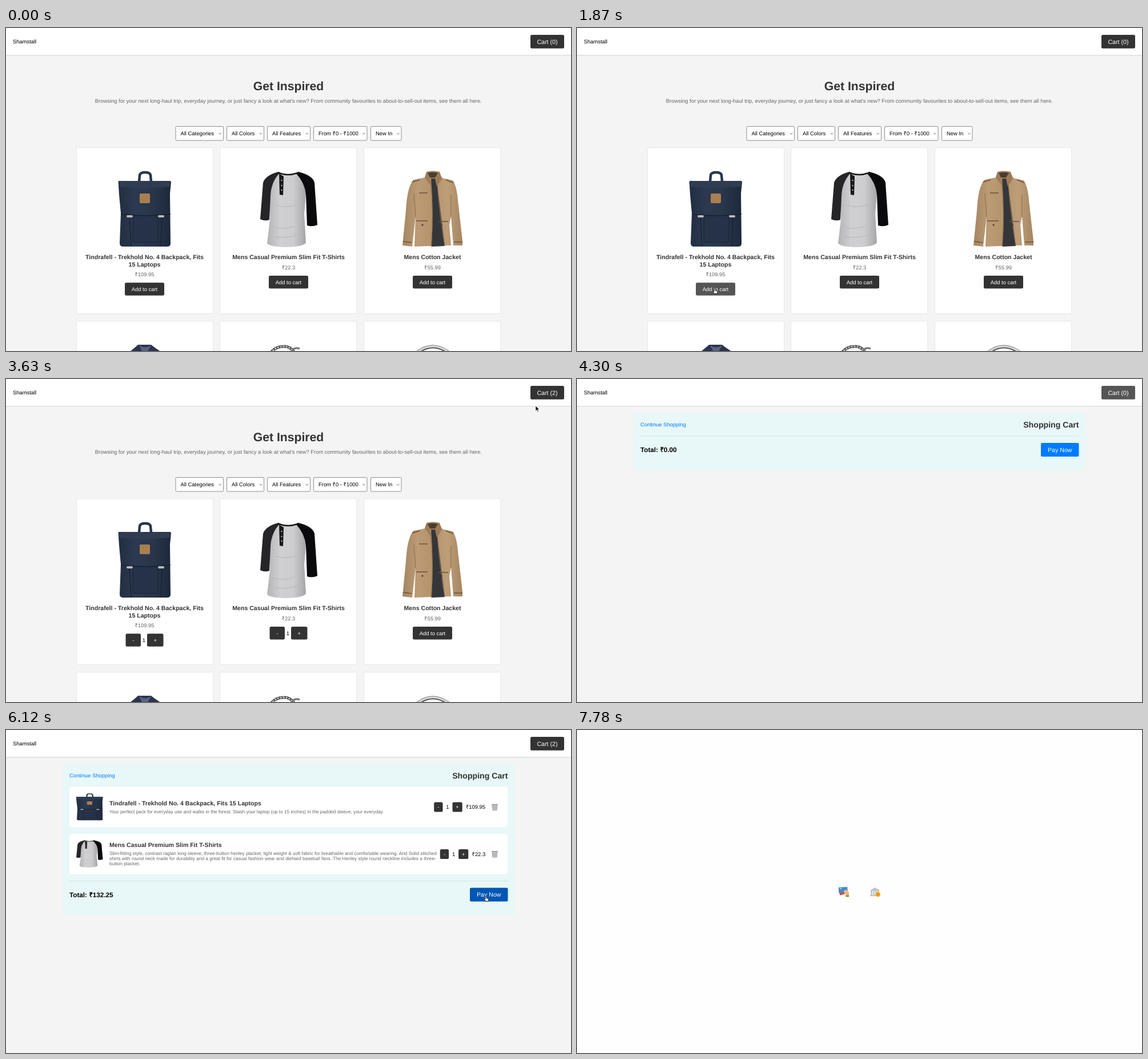
An HTML page for the animation above (8 s loop, 989 px wide and 566 px high).

```html
<!DOCTYPE html>
<html lang="en">
<head>
<meta charset="utf-8">
<title>Shop checkout</title>
<style>
html, body { margin: 0; width: 100%; height: 100%; overflow: hidden; background: #f4f4f4; }
svg { display: block; width: 989px; height: 566px; }
text { font-family: "Liberation Sans", Arial, sans-serif; text-rendering: geometricPrecision; white-space: pre; }
</style>
</head>
<body>
<svg id="stage" viewBox="0 0 989 566"></svg>
<script>
const LOOP = 8000;
const REM = 9.42, MID = 10.6;
const PACK = ['Tindrafell - Trekhold No. 4 Backpack, Fits', '15 Laptops'];
const SHIRT = 'Mens Casual Premium Slim Fit T-Shirts';

// Drawing helpers
const rect = (x, y, w, h, fill, r = 0, more = '') =>
  `<rect x="${x}" y="${y}" width="${w}" height="${h}" rx="${r}" fill="${fill}" ${more}/>`;
const text = (x, y, s, size = REM, fill = '#000', anchor = 'start', bold = false) =>
  `<text x="${x}" y="${y}" font-size="${size}" fill="${fill}" text-anchor="${anchor}" font-weight="${bold ? 700 : 400}">${s}</text>`;
const centered = (x, y, s, size, fill, bold) => text(x, y, s, size, fill, 'middle', bold);
const path = (d, fill, more = '') => `<path d="${d}" fill="${fill}" ${more}/>`;
const line = (d, color, width = 1, more = '') => path(d, 'none', `stroke="${color}" stroke-width="${width}" ${more}`);
const dot = (x, y, r, fill) => `<circle cx="${x}" cy="${y}" r="${r}" fill="${fill}"/>`;
const group = (id, body) => `<g id="${id}">${body}</g>`;
const shade = (id, ...colors) => `<linearGradient id="${id}">` +
  colors.map((c, i) => `<stop offset="${i / (colors.length - 1)}" stop-color="${c}"/>`).join('') + '</linearGradient>';
const button = (x, y, w, h, label, size = REM, base = '#333', hover = '#555', id = '') =>
  rect(x, y, w, h, base, 2.5, `class="button" data-base="${base}" data-hover="${hover}"`) +
  `<g ${id && `id="${id}"`}>${centered(x + w / 2, y + h / 2 + size * .35, label, size, '#fff')}</g>`;

const shades = shade('navy', '#222e42', '#2c3950', '#28354a', '#1d283b') +
  shade('grey', '#b4b4b6', '#d0d0d2', '#cdcdcf', '#a4a4a7') +
  shade('tan', '#a58662', '#bb9b75', '#b4936c', '#bd9e79', '#a58662');

// Product pictures
const backpack =
  line('M233 269L234 258Q235 253 243.5 253Q252 253 253 258L254 269', '#28364d', 4.5) +
  path('M196.5 269Q198 267 201 268H285Q288 267 289 270L287 290L288 378Q288 383 282 383H205Q199 383 199 377L201 325L198 292Z', 'url(#navy)') +
  path('M197 269H288L287 278Q243 282 198 278Z', '#2f3c52') +
  rect(222, 329, 44, 47, '#253247', 3, 'stroke="#1a2539"') +
  line('M201 326Q243 331 288 326M216 330L219 382M273 330L271 382', '#182336', 1.5) +
  rect(234, 290, 18, 17, '#a97f50', 2) +
  rect(211, 328, 11, 4, '#b9b9b5', 2) + rect(266, 328, 11, 4, '#b9b9b5', 2);

const tshirt =
  path('M476 253Q493 260 512 253L526 275L525 292L522 325L525 376Q522 383 492 384Q461 384 457 377L462 335L462 290L465 270Z', 'url(#grey)') +
  path('M477 252Q454 258 450 271L445 335Q453 339 461 336L463 294Q464 270 479 254Z', '#252527') +
  path('M511 252Q537 258 540 271L545 345Q536 349 527 346L525 292Q523 271 508 255Z', '#0a0a0c') +
  line('M476 253Q493 261 513 253', '#18181a', 2.5) +
  path('M478 255L486 260L485 293L479 292Z', '#18181a') +
  [267, 276, 284].map(y => dot(482.5, y, 1.1, '#ddd')).join('') +
  line('M466 348Q486 355 505 347M470 366Q492 370 518 360M472 310Q490 317 510 309', '#b5b5b8');

const jacket =
  path('M735 256L759 255L764 263L782 267Q789 277 791 302L799 373V381H783L779 330L776 345L779 381H768L715 383L717 330L711 383L694 381L700 320Q702 279 713 266L733 262Z', 'url(#tan)') +
  path('M744 263L753 262L757 292L768 382L745 383Q749 320 744 263Z', '#34363a') +
  path('M733 262L736 252Q747 249 759 252L763 264L754 278L751 264H742L743 275Z', '#9c7c57') +
  path('M738 254Q747 252 756 254L751 262H742Z', '#4a3c2f') +
  line('M743 268Q749 325 744 383M755 274Q759 330 768 382M717 331L714 290M779 331L779 292', '#8d6d4a') +
  line('M711 270L724 266M770 266L783 271M723 289H738M718 338H738M757 339H774M695 374L710 376M784 375H799', '#6c5137', 1.5) +
  dot(729, 345, 1.5, '#473424') + dot(762, 345, 1.5, '#473424');

const lowerRow =
  path('M213 570Q226 560 231 555H254Q261 561 276 570Z', '#2b344e') +
  path('M233 556Q243 563 254 556L246 570H240Z', '#596480') +
  line('M460 575Q468 558 486 558Q499 557 507 572', '#4c4b49', 5) +
  line('M461 574Q469 558 486 558Q498 558 506 570', '#c8c8c8', 2.5, 'stroke-dasharray="3 2"') +
  line('M501 564Q507 559 514 562', '#777', 3) +
  line('M709 575Q747 537 786 575', '#8b8b8b', 1.5) + line('M714 573Q747 544 781 573', '#d4d4d4', 4) +
  line('M718 573Q747 548 777 573', '#333', 1.5);

// Shop page
const select = (x, w, label) =>
  rect(x, 172.5, w, 24.5, '#fff', 1.5, 'stroke="#858585" stroke-width=".9"') +
  text(x + 8.5, 188.2, label) +
  line(`M${x + w - 7.8} 184l2.2 2.2l2.2-2.2`, '#555', .9);

const addBox = (id, cx, y) =>
  group(id + 'Add', button(cx - 34.5, y, 69, 22.5, 'Add to cart')) +
  group(id + 'Qty', button(cx - 33, y, 26.5, 22.5, '-') + centered(cx - 1.2, y + 14.5, '1') +
    button(cx + 4.5, y, 28.5, 22.5, '+'));

const product = (id, cx, lines, price, picture) => {
  const dy = (lines.length - 1) * 12.3;
  return lines.map((s, i) => centered(cx, 405.3 + i * 12.3, s, MID, '#333', true)).join('') +
    centered(cx, 422.7 + dy, price, REM, '#666') + addBox(id, cx, 434 + dy) + picture;
};

const cards = [124, 375, 627].map(x =>
  [209.8, 513.8].map(y => rect(x - .3, y, 239, 290.5, '#fff', 2, 'stroke="#e2e2e2" stroke-width=".8"')).join('')).join('');

const shop =
  centered(494.5, 108.7, 'Get Inspired', 21.2, '#333', true) +
  centered(494.3, 131.3, "Browsing for your next long-haul trip, everyday journey, or just fancy a look at what's new? From community favourites to about-to-sell-out items, see them all here.", REM, '#666') +
  select(297, 83.5, 'All Categories') + select(386.5, 65, 'All Colors') + select(457.5, 75, 'All Features') +
  select(538.5, 93.5, 'From ₹0 - ₹1000') + select(638.5, 53.5, 'New In') +
  cards +
  product('pack', 242.5, PACK, '₹109.95', backpack) +
  product('shirt', 494.5, [SHIRT], '₹22.3', tshirt) +
  product('jacket', 746.5, ['Mens Cotton Jacket'], '₹55.99', jacket) +
  lowerRow;

// Cart page
const foot = dy =>
  rect(99, 59.5, 792, 100.5 + dy, '#e8f7f7', 6) +
  rect(111, 99.6 + dy, 767.5, .9, '#d3e3e3') +
  text(111, 128.2 + dy, 'Total: ₹' + (dy ? '132.25' : '0.00'), 11.7, '#000', 'start', true) +
  button(812, 112 + dy, 66.5, 24, 'Pay Now', MID, '#007bff', '#0056b3');

const bin = y =>
  path(`M851 ${y + 2.5}h9l-1 9.5h-7Z`, '#ccc', 'stroke="#8c8c8c" stroke-width=".8"') +
  line(`M850 ${y + 1.7}h11M853.7 ${y + 4}l.4 6M857.3 ${y + 4}l-.4 6`, '#8c8c8c', 1);

const item = (y, title, titleY, notes, x, price, picture) =>
  rect(111, y, 767.5, 70.5, '#fff', 5) + picture +
  text(181, titleY, title, MID, '#333', 'start', true) +
  notes.map((s, i) => text(181, titleY + 13.3 + i * 9.4, s, 8.25, '#666')).join('') +
  button(x, y + 27, 15.3, 17, '-') + centered(x + 23.7, y + 38.6, '1') +
  button(x + 32.3, y + 27, 17.2, 17, '+') + text(x + 55.7, y + 38.6, price) + bin(y + 29);

const scaled = (picture, x, y, left, sx, sy) =>
  `<g transform="translate(${x} ${y}) scale(${sx} ${sy}) translate(${-left} -251)">${picture}</g>`;

const cart =
  group('empty', foot(0)) +
  group('filled', foot(164.6) +
    item(99.6, PACK.join(' '), 132.4, ['Your perfect pack for everyday use and walks in the forest. Stash your laptop (up to 15 inches) in the padded sleeve, your everyday'],
      749.2, '₹109.95', scaled(backpack, 123, 111, 197, .508, .358)) +
    item(182, SHIRT, 205.2, [
      'Slim-fitting style, contrast raglan long sleeve, three-button henley placket, light weight &amp; soft fabric for breathable and comfortable wearing. And Solid stitched',
      'shirts with round neck made for durability and a great fit for casual fashion wear and diehard baseball fans. The Henley style round neckline includes a three-',
      'button placket.'], 759.8, '₹22.3', scaled(tshirt, 123, 193, 445, .465, .36))) +
  text(111, 83, 'Continue Shopping', 9.38, '#007bff') +
  text(878.5, 84.8, 'Shopping Cart', 14.13, '#333', 'end', true);

const header =
  rect(0, 47, 989, 1, '#dcdcdc') + rect(0, 48, 989, 1, '#ececec') + rect(0, 0, 989, 47, '#fff') +
  text(12, 27, 'Shamstall', 9.4) +
  button(918, 12, 59, 23.8, 'Cart (0)', 10.7, '#333', '#555', 'count');

const overlay = rect(0, 0, 989, 566, '#000', 0, 'opacity=".3"') +
  `<circle cx="494.5" cy="283" r="10.6" fill="none" stroke="#d0d0d0" stroke-width="1.5"/>` +
  line('M494.5 272.4A10.6 10.6 0 0 1 505.1 283', '#fff', 1.5);

const icons =
  rect(459, 280, 15, 8, '#d9473f', 1, 'transform="rotate(-17 466 284)"') +
  rect(458, 275.3, 15.5, 9.5, '#398fd2', 1, 'transform="rotate(-3 466 280)"') +
  rect(460, 276.8, 3, 2, '#f2c84b') +
  path('M467 282L471 279.5L476 284V290H470.5L468 286Z', '#f3b98a') +
  rect(470.3, 289.5, 5.7, 3, '#7d9b35') +
  path('M513 281L521.5 276L530 281V282H513Z', '#bfc3c8') +
  [515, 518.7, 522.4, 526.1].map(x => rect(x, 282, 1.8, 7, '#a9aeb5')).join('') +
  rect(513, 289, 17, 2.2, '#bfc3c8') +
  dot(526.7, 288, 4.3, '#f7a51c') + dot(526.7, 288, 2.3, '#f08d0c');

const arrow = path('M0 0V9L2.1 7.1L3.7 10.4L5.2 9.7L3.7 6.6H6.5Z', '#000', 'stroke="#fff" stroke-width=".7"');
const hand = path('M-1 1Q0-.5 1 1V4L4.3 5Q5 5.3 4.8 7L4 9.5H-.2L-3 6.2Q-2.7 4.7-1 6Z', '#fff', 'stroke="#000" stroke-width=".8"');

const stage = document.getElementById('stage');
stage.innerHTML = `<defs>${shades}</defs>` + rect(0, 0, 989, 566, '#f4f4f4') +
  group('shop', shop) + group('cart', cart) + header +
  group('overlay', overlay) + group('cursor', group('arrow', arrow) + group('hand', hand)) +
  group('done', rect(0, 0, 989, 566, '#fefefe') + group('icons', icons));

const $ = id => document.getElementById(id);
const show = (id, on) => { $(id).style.display = on ? '' : 'none'; };
const buttons = [...document.querySelectorAll('.button')].map(el => ({
  el, x: +el.getAttribute('x'), y: +el.getAttribute('y'),
  w: +el.getAttribute('width'), h: +el.getAttribute('height')
}));
const countText = $('count').firstChild;

// Pointer path: time, x, y
const route = [
  [380, 150, 567], [610, 156, 500], [870, 156, 500], [1080, 177, 448], [1260, 203, 452],
  [1510, 203, 452], [1870, 241, 456], [2260, 241, 456], [2630, 510, 431], [2770, 510, 431],
  [2770, 493, 444], [3230, 493, 444], [3490, 927, 47], [3630, 927, 47], [3710, 939, 38],
  [3850, 939, 38], [3850, 947, 25], [5150, 947, 25], [5930, 840, 290.5]
];
function pointer(t) {
  const next = route.findIndex(k => k[0] > t);
  if (next === 0) return [0, 600];
  if (next < 0) return route[route.length - 1].slice(1);
  const [t0, x0, y0] = route[next - 1], [t1, x1, y1] = route[next];
  const u = (t - t0) / (t1 - t0), e = u * u * (3 - 2 * u);
  return [x0 + (x1 - x0) * e, y0 + (y1 - y0) * e];
}

function draw(now) {
  const t = now % LOOP;
  const full = t >= 4450;
  show('shop', t < 4300);
  show('cart', t >= 4300);
  show('empty', !full);
  show('filled', full);
  [['pack', 2110], ['shirt', 3010], ['jacket', LOOP]].forEach(([id, at]) => {
    show(id + 'Add', t < at);
    show(id + 'Qty', t >= at);
  });
  const count = t < 2110 ? 0 : t < 3010 ? 1 : t < 4300 || full ? 2 : 0;
  countText.textContent = `Cart (${count})`;
  show('overlay', t >= 7230);
  show('done', t >= 7560);
  show('icons', t >= 7640);

  const [x, y] = pointer(t);
  let over = false;
  for (const b of buttons) {
    const hit = b.el.getClientRects().length > 0 && x >= b.x && x <= b.x + b.w && y >= b.y && y <= b.y + b.h;
    over = over || hit;
    b.el.setAttribute('fill', hit ? b.el.dataset.hover : b.el.dataset.base);
  }
  show('cursor', t >= 380 && (t < 3850 || t > 5150));
  show('arrow', !over);
  show('hand', over);
  $('cursor').setAttribute('transform', `translate(${x} ${y})`);
}

function tick() {
  draw(performance.now());
  requestAnimationFrame(tick);
}
tick();
</script>
</body>
</html>
```
